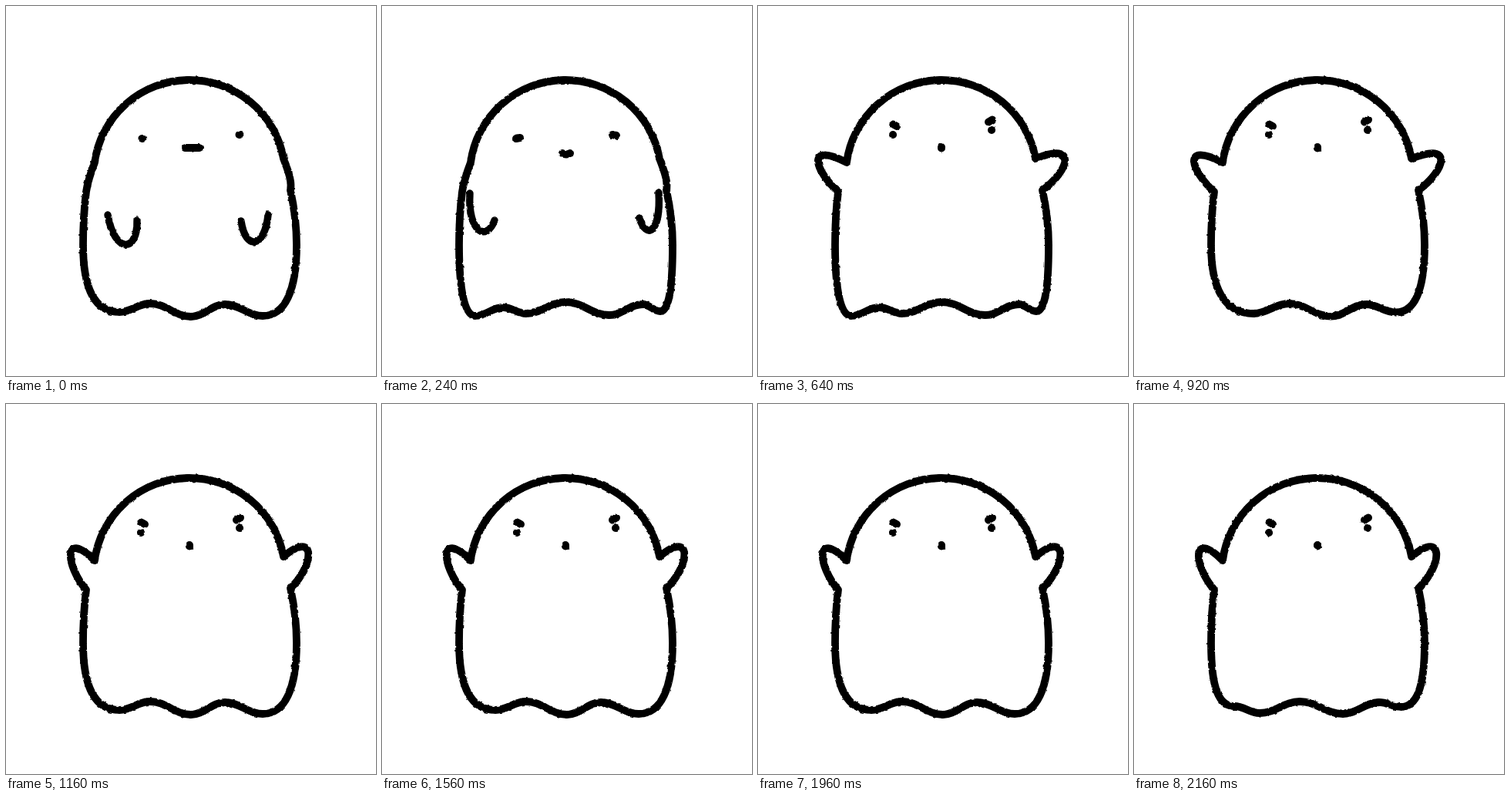
These frames come from a looping animation (480 px wide and 480 px high, 2.24 s). An HTML page:

```html
<!DOCTYPE html>
<html>
<head>
<meta charset="utf-8">
<style>
  html, body { margin: 0; width: 100%; height: 100%; overflow: hidden; background: #fff; }
  svg { display: block; width: 100vw; height: 100vh; }
</style>
</head>
<body>
<svg viewBox="0 0 480 480">
  <filter id="rough" filterUnits="userSpaceOnUse" x="0" y="0" width="480" height="480" color-interpolation-filters="sRGB">
    <feTurbulence id="noise" type="fractalNoise" baseFrequency=".22"/>
    <feDisplacementMap in="SourceGraphic" scale="3" xChannelSelector="R" yChannelSelector="G"/>
  </filter>
  <g filter="url(#rough)" fill="none" stroke="#000" stroke-linecap="round" stroke-linejoin="round">
    <path id="body" stroke-width="9.8"/>
    <path id="arms" stroke-width="9.4"/>
    <path id="face" stroke-width="10"/>
  </g>
</svg>
<script>
const LOOP = 2240;
const $ = id => document.getElementById(id);
const mix = (a, b) => a.map((p, i) => p.map((v, j) => (v + b[i][j]) / 2));

// Troughs and crests of the hem; the ripple moves to the right
const ripple = [[147, 397], [187, 386], [240, 403], [284, 387], [333, 402]];
const further = [[130, 392], [163, 401], [215, 386], [271, 402], [318, 387], [346, 393]];
const furthest = [[121, 402], [157, 391], [187, 399], [238, 384], [295, 401], [338, 387], [361, 396]];
const hems = [ripple, mix(ripple, further.slice(1)), further, furthest];

// Bezier handles of the left side between shoulder and armpit
const tucked = [[110, 216], [106, 228]];
const low = [[75, 215], [70, 275]];
const level = [[64, 192], [70, 232]];
const wide = [[60, 175], [75, 215]];
const high = [[74, 162], [77, 210]];

const belly = 'M132,271C141,322 171,320 170,278M340,271C336,313 311,319 305,279';
const between = 'M123,257C126,308 154,313 158,278M349,257C349,304 327,312 320,277';
const hips = 'M114,243C111,294 136,306 146,278M359,242C362,294 343,304 334,275';

const neutral = 'M176.5,172h.8M302.5,167h.8M233,184h18';
const smile = 'M174,172l5,-1M299,167l5,1M234,191q5,3 10,0';
const angry = 'M175.5,153.5l4.5,2.5M175,167h.1M299,150.5l5,-3M303,161h.1M238,183v1.5';

// Arms and face over time: [start, handles, resting arms, face]
const acts = [
  [0, tucked, belly, neutral],
  [120, tucked, between, neutral],
  [240, tucked, hips, smile],
  [320, low, '', smile],
  [440, level, '', angry],
  [560, wide, '', angry]
];

// Waves level off at each trough and crest
function hemPath(hem) {
  const [lx, ly] = hem[0], [rx, ry] = hem.at(-1);
  let d = `C100,370 ${lx - .65 * (lx - 100)},${ly} ${lx},${ly}`;
  hem.slice(1).forEach(([x, y], i) => {
    const [px, py] = hem[i], reach = .4 * (x - px);
    d += `C${px + reach},${py} ${x - reach},${y} ${x},${y}`;
  });
  return d + `C${rx + .65 * (377 - rx)},${ry} 377,370 377,310`;
}

function outline(hem, [a, b]) {
  const flip = ([x, y]) => [477 - x, y];
  return `M115,203C${a} ${b} 104,241C101,265 100,285 100,310${hemPath(hem)}`
    + `C377,285 374,262 369,239C${flip(b)} ${flip(a)} 360,198A124 123.5 0 0 0 115,203Z`;
}

// Ten drawings a second, snapped up to a 40 ms grid, with one longer hold
function stepAt(t) {
  const held = t >= 2040 && t < 2080 ? 2000 : t;
  return Math.floor((Math.floor(held / 40) * 40 + 60) / 100);
}

let last = '';
function draw() {
  const t = performance.now() % LOOP, step = stepAt(t);
  const [start, reach, arms, face] = acts.findLast(act => t >= act[0]);
  const flap = step > 7 && step % 2 === 0 ? high : reach;
  const key = step + ' ' + start;
  if (key !== last) {
    last = key;
    $('body').setAttribute('d', outline(hems[step % 4], flap));
    $('arms').setAttribute('d', arms);
    $('face').setAttribute('d', face);
    $('noise').setAttribute('seed', step % 4);
  }
  requestAnimationFrame(draw);
}
draw();
</script>
</body>
</html>
```
